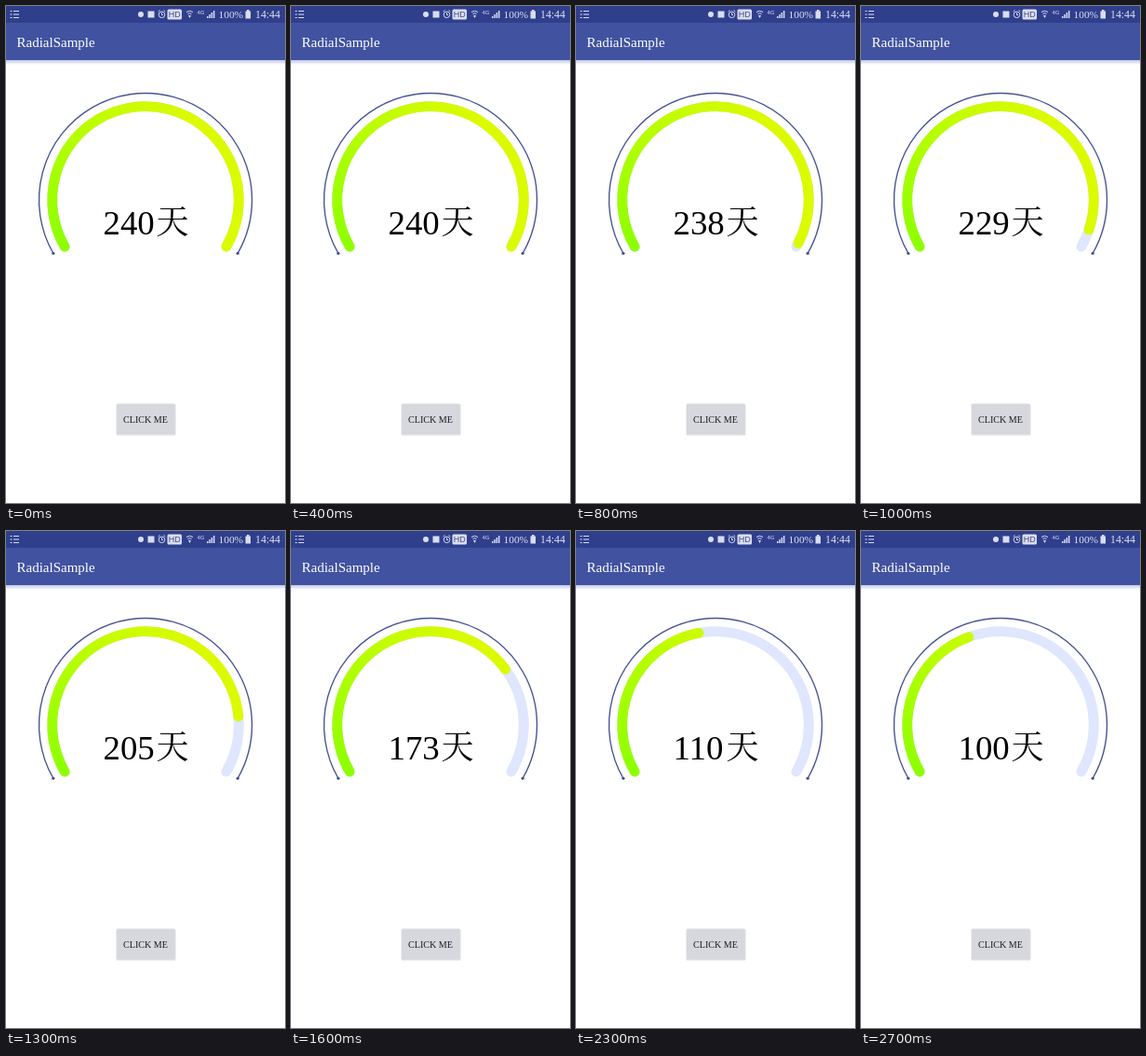
These frames come from a looping animation (300 px wide and 533 px high, 4000 ms). An HTML page with a canvas:

```html
<!DOCTYPE html>
<html lang="zh">
<head>
<meta charset="utf-8">
<title>Radial gauge</title>
<style>
  html, body { margin: 0; width: 100%; height: 100%; overflow: hidden; background: #fff; }
  svg, canvas { position: absolute; left: 0; top: 0; width: 300px; height: 533px; }
  text { font-family: "Liberation Serif", "Noto Serif CJK SC", "Noto Sans CJK SC", "Noto Sans CJK", serif; }
  .bar text { fill: #dfe2f4; }
  .bar .title { fill: #fff; }
  .bar .sans { font-family: "Liberation Sans", sans-serif; }
  .icons { fill: #d9ddf2; }
  .lines { fill: none; stroke: #d9ddf2; stroke-width: 1; }
  .unit { font-weight: 300; }
</style>
</head>
<body>
<canvas id="gauge"></canvas>
<svg viewBox="0 0 300 533">
  <defs>
    <linearGradient id="shade" x2="0" y2="1">
      <stop stop-color="#c3c6e6"/>
      <stop offset="1" stop-color="#fff"/>
    </linearGradient>
  </defs>

  <g class="bar">
    <rect y="58" width="300" height="5" fill="url(#shade)"/>
    <rect width="300" height="58" fill="#4152a0"/>
    <rect width="300" height="18" fill="#303f8c"/>
    <text class="title" x="11.5" y="43.5" font-size="15">RadialSample</text>

    <g class="lines">
      <path d="M4.5 5.5h2M8 5.5h6M4.5 9h2M8 9h6M4.5 12.5h2M8 12.5h6"/>
      <circle cx="167.5" cy="9.3" r="3.3"/>
      <path d="M167.5 7.3v2.2h1.5M163.7 6l1.8-1.6M171.3 6l-1.8-1.600"/>
      <path d="M194 6.500q3.500-2.500 7 0M195.500 8.500q2-1.500 4 0"/>
    </g>
    <g class="icons">
      <circle cx="145" cy="9" r="3"/>
      <rect x="152.500" y="5.500" width="7" height="7"/>
      <rect x="173.500" y="3.500" width="15.500" height="11" rx="1.500"/>
      <path d="M196 10h3l-1.500 3z"/>
      <path d="M216 13v-2h1.500v2zM218.300 13v-4h1.500v4zM220.600 13v-6h1.500v6zM222.900 13v-8h1.500v8z"/>
      <path d="M257.500 5.500h1.500v-1.500h2.500v1.500h1.500v8h-5.500z"/>
    </g>
    <text class="sans" x="181.300" y="12.300" font-size="9" text-anchor="middle" style="fill:#46507f">HD</text>
    <text class="sans" x="205.500" y="9" font-size="6">4G</text>
    <text x="228.500" y="13" font-size="11.400">100%</text>
    <text x="268" y="13" font-size="11.800">14:44</text>
  </g>

  <text id="days" x="104.500" y="244.500" font-size="36.800">240</text>
  <text class="unit" x="161.500" y="243.500" font-size="35">天</text>

  <rect x="118.500" y="427" width="64" height="33.500" rx="1.500" fill="#c6c6d2" opacity=".6"/>
  <rect x="119" y="426.500" width="62.500" height="32.500" rx="1" fill="#d7d7de"/>
  <text x="150" y="446.500" font-size="10.100" text-anchor="middle" fill="#1c1c20">CLICK ME</text>
</svg>

<script>
  const LOOP = 4000, STEP = 100;
  const BEGIN = 631, DURATION = 2000;
  const FULL = 240, REST = 100;
  const CX = 150, CY = 208;
  const RIM = 114.5, RING = 100.3, THICK = 10.8;

  const canvas = document.getElementById('gauge');
  const days = document.getElementById('days');
  const scale = window.devicePixelRatio || 1;
  canvas.width = 300 * scale;
  canvas.height = 533 * scale;
  const ctx = canvas.getContext('2d');
  ctx.scale(scale, scale);
  ctx.lineCap = 'round';

  const rad = deg => deg * Math.PI / 180;

  // Angles run clockwise; the gradient's seam sits in the gap at the bottom.
  const sweep = ctx.createConicGradient(rad(90), CX, CY);
  const stops = [[90, '#8aff00'], [150, '#8dff00'], [195, '#a4ff00'],
                 [250, '#c8fc00'], [300, '#dcfa00'], [450, '#d8fc00']];
  stops.forEach(([deg, color]) => sweep.addColorStop((deg - 90) / 360, color));

  function arc(radius, degrees, width, color) {
    ctx.beginPath();
    ctx.arc(CX, CY, radius, rad(150), rad(150 + degrees));
    ctx.lineWidth = width;
    ctx.strokeStyle = color;
    ctx.stroke();
  }

  function dot(deg) {
    ctx.beginPath();
    ctx.arc(CX + RIM * Math.cos(rad(deg)), CY + RIM * Math.sin(rad(deg)), 1.6, 0, 2 * Math.PI);
    ctx.fillStyle = '#404c88';
    ctx.fill();
  }

  // Accelerate, then decelerate, settling a touch late.
  function valueAt(time) {
    const p = Math.min(1, Math.max(0, (time - BEGIN) / DURATION));
    const q = p - 0.015 * p ** 8;
    return FULL - (FULL - REST) * (1 - Math.cos(Math.PI * q)) / 2;
  }

  function draw() {
    const time = Math.floor(performance.now() % LOOP / STEP) * STEP;
    const value = valueAt(time);
    ctx.clearRect(0, 0, 300, 533);
    arc(RIM, FULL, 1.4, '#485492');
    dot(150);
    dot(390);
    arc(RING, FULL, THICK, '#dfe6fd');
    arc(RING, value, THICK, sweep);
    days.textContent = Math.round(value);
    requestAnimationFrame(draw);
  }
  draw();
</script>
</body>
</html>
```
